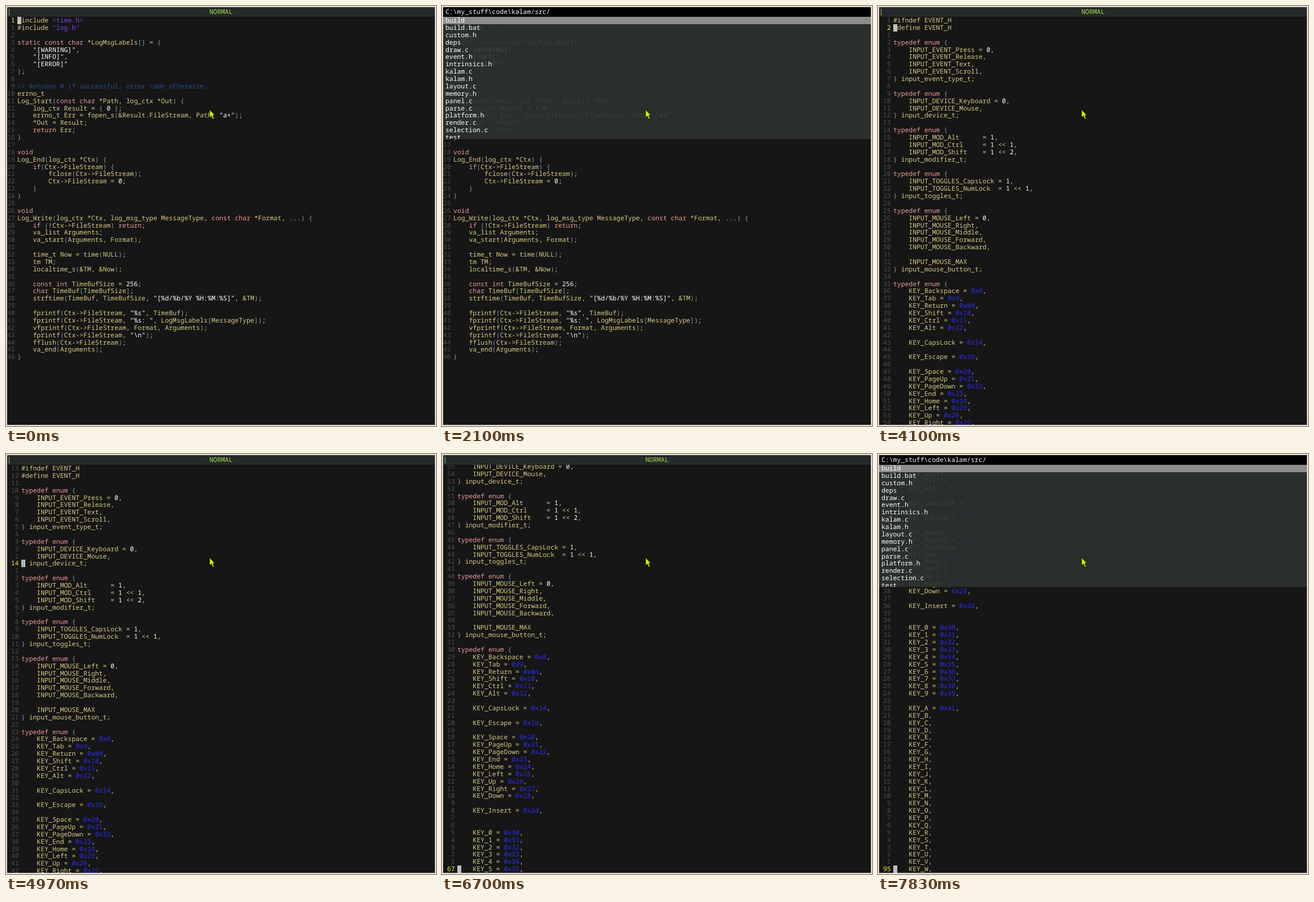
An HTML page that plays this animation: 758 px wide and 739 px high, repeating every 8 s.

```html
<!DOCTYPE html>
<html lang="en">
<head>
<meta charset="utf-8">
<title>Code editor</title>
<style>
  html, body { margin: 0; width: 100%; height: 100%; overflow: hidden; background: #161616; }
  #stage {
    --row: 12.875px;
    position: relative; width: 758px; height: 739px; overflow: hidden; background: #161616;
    font: 11.425px/var(--row) "Noto Sans Mono", "DejaVu Sans Mono", monospace;
    text-rendering: geometricPrecision; font-variant-ligatures: none; white-space: pre; color: #d6cb82;
  }
  #stage div { position: absolute; }
  #frame { inset: 0; box-sizing: border-box; border: 2px solid #dedede; }
  #bar { left: 2px; top: 2px; width: 754px; height: 17px; line-height: 17px; background: #262929; color: #a2d84c; text-align: center; }
  #mark { left: 3px; top: 3px; width: 1px; height: 12px; background: #8fcb44; }
  #view { left: 2px; top: 19px; width: 754px; height: 718px; overflow: hidden; }
  #page { left: 0; top: 0; }
  #nums { left: 0; top: 1px; text-align: right; color: #4e4e4e; }
  #nums b { font-weight: normal; color: #f2f224; }
  #code { top: 1px; }
  #caret { width: 6.855px; height: var(--row); background: #bebebe; }
  #popup { left: 2px; top: 2px; width: 754px; height: 232px; overflow: hidden; color: #fff; }
  #path { left: 0; top: 0; width: 750px; height: 17px; line-height: 17px; padding-left: 4px; background: #000; }
  #list { left: 0; top: 17px; width: 754px; background: rgba(45, 49, 47, .9); }
  #list p { margin: 0; padding-left: 4px; height: var(--row); line-height: calc(var(--row) + 2px); }
  #list p.on { background: #8c8c8c; }
  #mouse { position: absolute; left: 357px; top: 181px; }
  .rem { color: #1f4f94; }
  .kw { color: #e99a98; }
  .inc { color: #7a48ee; }
  .str, .num { color: #fff; }
  .hex { color: #2c2cf6; }
  .br { color: #7d99a6; }
</style>
</head>
<body>
<div id="stage">
  <div id="view"><div id="page"><div id="nums"></div><div id="caret"></div><div id="code"></div></div></div>
  <div id="bar"><div id="mark"></div>NORMAL</div>
  <div id="popup"><div id="path"></div><div id="list"></div></div>
  <svg id="mouse" width="16" height="22"><path d="M2 1.5V15l3-2.6L7.6 18l2.2-1-2.5-5.4h3.9z" fill="#c8ff00" stroke="#101400" stroke-width=".7"/></svg>
  <div id="frame"></div>
</div>
<script>
const LOOP = 8000, ROW = 12.875, CHAR = 6.855, VIEW = 718;
const $ = id => document.getElementById(id);

const logSource = String.raw`#include <time.h>
#include "log.h"

static const char *LogMsgLabels[] = {
    "[WARNING]",
    "[INFO]",
    "[ERROR]"
};

// Returns 0 if successful, error code otherwise.
errno_t
Log_Start(const char *Path, log_ctx *Out) {
    log_ctx Result = { 0 };
    errno_t Err = fopen_s(&Result.FileStream, Path, "a+");
    *Out = Result;
    return Err;
}

void
Log_End(log_ctx *Ctx) {
    if(Ctx->FileStream) {
        fclose(Ctx->FileStream);
        Ctx->FileStream = 0;
    }
}

void
Log_Write(log_ctx *Ctx, log_msg_type MessageType, const char *Format, ...) {
    if (!Ctx->FileStream) return;
    va_list Arguments;
    va_start(Arguments, Format);

    time_t Now = time(NULL);
    tm TM;
    localtime_s(&TM, &Now);

    const int TimeBufSize = 256;
    char TimeBuf[TimeBufSize];
    strftime(TimeBuf, TimeBufSize, "[%d/%b/%Y %H:%M:%S]", &TM);

    fprintf(Ctx->FileStream, "%s", TimeBuf);
    fprintf(Ctx->FileStream, "%s: ", LogMsgLabels[MessageType]);
    vfprintf(Ctx->FileStream, Format, Arguments);
    fprintf(Ctx->FileStream, "\n");
    fflush(Ctx->FileStream);
    va_end(Arguments);
}`;

const digitKeys = [...'0123456789'].map(d => `    KEY_${d} = 0x3${d},`).join('\n');
const letterKeys = [...'BCDEFGHIJKLMNOPQRSTUVWXYZ'].map(c => `    KEY_${c},`).join('\n');
const eventSource = `#ifndef EVENT_H
#define EVENT_H

typedef enum {
    INPUT_EVENT_Press = 0,
    INPUT_EVENT_Release,
    INPUT_EVENT_Text,
    INPUT_EVENT_Scroll,
} input_event_type_t;

typedef enum {
    INPUT_DEVICE_Keyboard = 0,
    INPUT_DEVICE_Mouse,
} input_device_t;

typedef enum {
    INPUT_MOD_Alt      = 1,
    INPUT_MOD_Ctrl     = 1 << 1,
    INPUT_MOD_Shift    = 1 << 2,
} input_modifier_t;

typedef enum {
    INPUT_TOGGLES_CapsLock = 1,
    INPUT_TOGGLES_NumLock  = 1 << 1,
} input_toggles_t;

typedef enum {
    INPUT_MOUSE_Left = 0,
    INPUT_MOUSE_Right,
    INPUT_MOUSE_Middle,
    INPUT_MOUSE_Forward,
    INPUT_MOUSE_Backward,

    INPUT_MOUSE_MAX
} input_mouse_button_t;

typedef enum {
    KEY_Backspace = 0x8,
    KEY_Tab = 0x9,
    KEY_Return = 0x0d,
    KEY_Shift = 0x10,
    KEY_Ctrl = 0x11,
    KEY_Alt = 0x12,

    KEY_CapsLock = 0x14,

    KEY_Escape = 0x1b,

    KEY_Space = 0x20,
    KEY_PageUp = 0x21,
    KEY_PageDown = 0x22,
    KEY_End = 0x23,
    KEY_Home = 0x24,
    KEY_Left = 0x25,
    KEY_Up = 0x26,
    KEY_Right = 0x27,
    KEY_Down = 0x28,

    KEY_Insert = 0x2d,


${digitKeys}

    KEY_A = 0x41,
${letterKeys}
} input_key_t;

#endif`;

const TOKENS = /(\/\/.*)|(<\w+\.h>|"log\.h")|("[^"]*")|(\b0x\w+)|(\b\d+\b)|(\b(?:static|const|char|int|void|if|return|typedef|enum)\b)|([(){}[\]])|[<>&]/g;
const CLASSES = ['rem', 'inc', 'str', 'hex', 'num', 'kw', 'br'];
const escape = s => s.replace(/&/g, '&amp;').replace(/</g, '&lt;');
const paint = src => src.replace(TOKENS, (m, ...groups) => {
  const k = groups.slice(0, CLASSES.length).findIndex(Boolean);
  return k < 0 ? escape(m) : `<span class="${CLASSES[k]}">${escape(m)}</span>`;
});

const makeFile = (src, digits) => ({ html: paint(src), lines: src.split('\n').length, digits });
const files = { log: makeFile(logSource, 2), event: makeFile(eventSource, 3) };

const ROOT = 'C:\\my_stuff\\code\\kalam/', SRC = ROOT + 'src/';
const rootList = 'bin data src build.bat config.h debug.c font.c input.c log.c log.h main.c notes.txt readme.md text.c todo.txt utils.c window.c'.split(' ');
const srcList = 'build build.bat custom.h deps draw.c event.h intrinsics.h kalam.c kalam.h layout.c memory.h panel.c parse.c platform.h render.c selection.c test'.split(' ');
const match = ['event.h'];

// start time, open file, popup path, entries, selected row
const steps = [
  [0, 'log'],
  [500, 'log', ROOT, rootList, 0],
  [1030, 'log', ROOT, rootList, 1],
  [1300, 'log', ROOT, rootList, 2],
  [2100, 'log', SRC, srcList, 0],
  [3030, 'log', SRC + 'e', match, 0],
  [3170, 'log', SRC + 'ev', match, 0],
  [3300, 'log', SRC + 'eve', match, 0],
  [3430, 'event'],
  [7830, 'event', SRC, srcList, 0],
];

// One key press, then auto-repeat at two lines per tick, 15 ticks a second.
function lineAt(t) {
  if (t < 4100) return 1;
  if (t < 4630) return 2;
  const ticks = Math.min(46, 1 + Math.floor((t - 4629) * 15 / 1000));
  return 2 + ticks * 2 + (ticks > 13 ? 1 : 0);
}

function showFile(name, line) {
  const { lines, digits } = files[name];
  const left = digits * CHAR + 4.4;
  $('nums').style.width = digits * CHAR + 'px';
  $('nums').innerHTML = Array.from({ length: lines }, (_, i) =>
    i + 1 === line ? `<b>${line}</b>` : Math.abs(i + 1 - line)).join('\n');
  $('code').style.left = left + 'px';
  $('caret').style.left = left + 'px';
  $('caret').style.top = (line - 1) * ROW + 'px';
  $('page').style.top = -Math.max(0, line * ROW - VIEW) + 'px';
}

function showPopup(path, entries, selected) {
  $('popup').style.display = path ? '' : 'none';
  if (!path) return;
  $('path').textContent = path;
  $('list').innerHTML = entries.map((e, i) => `<p${i === selected ? ' class="on"' : ''}>${e}</p>`).join('');
}

let shownStep, shownFile, shownLine;
function draw() {
  const t = Math.floor(performance.now() % LOOP / 10) * 10;
  const step = steps.findLast(s => s[0] <= t);
  const [, file, path, entries, selected] = step;
  const line = lineAt(t);
  if (file !== shownFile) $('code').innerHTML = files[file].html;
  if (file !== shownFile || line !== shownLine) showFile(file, line);
  if (step !== shownStep) showPopup(path, entries, selected);
  [shownStep, shownFile, shownLine] = [step, file, line];
  requestAnimationFrame(draw);
}
draw();
</script>
</body>
</html>
```
